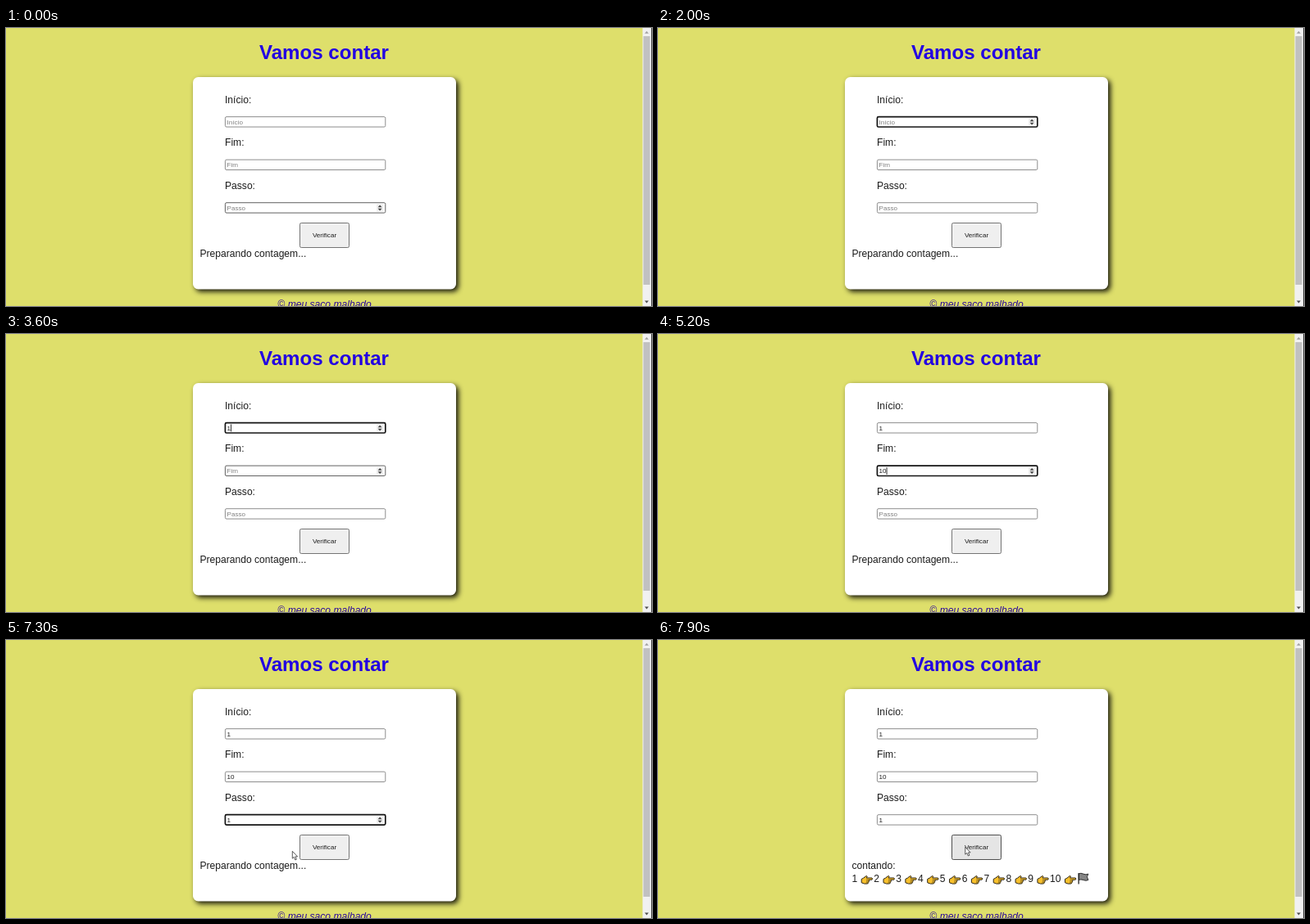
Recreate the animation shown at these times as an HTML page. Size 788 by 340 pixels, loop 8000 ms.

```html
<!DOCTYPE html>
<html lang="pt">
<head>
<meta charset="utf-8">
<title>Vamos contar</title>
<style>
  html, body { margin: 0; width: 100%; height: 100%; overflow: hidden; background: #dedf6b; }
  svg { display: block; width: 788px; height: 340px; font: 12.1px "Liberation Sans", Arial, sans-serif; fill: #1c1c1c; }
  .card { fill: #fff; filter: drop-shadow(3.8px 3.8px 3.4px rgba(0, 0, 0, .9)); }
  .title { font-size: 24.1px; font-weight: bold; fill: #2200e2; text-anchor: middle; }
  .foot { font-style: italic; fill: #2c0a9c; text-anchor: middle; }
  .small { font-size: 8.1px; }
  .box { fill: #fff; stroke: #808080; stroke-width: .9; }
  .hover .box { stroke: #505050; }
  .focus .box { stroke: #141414; stroke-width: 1.7; }
  .empty .small { fill: #808080; }
  .spin, .caret { visibility: hidden; }
  .hover .spin, .focus .spin { visibility: visible; }
  .button { fill: #efefef; stroke: #757575; }
</style>
</head>
<body>
<svg viewBox="0 0 788 340">
  <defs>
    <g id="hand" stroke="#2b2417" stroke-width="1" stroke-linejoin="round">
      <path fill="#f8c02c" d="M.6 4.6 L3 3.4 L6.2 .9 Q7.6 .5 7.6 1.8 L6.6 3.2 H13.4 Q14.6 4.3 13.4 5.4 H9.8 Q10.6 6.6 9.6 7.3 Q10 8.5 8.9 9 Q8.8 10.3 7.3 10.3 H4.2 L.6 9 Z"/>
      <path fill="none" stroke-width=".6" d="M6.6 5.4H9.8M6.4 7.3H9.6M6.2 9H8.9"/>
    </g>
    <g id="flag" stroke="#222" stroke-linejoin="round">
      <path fill="#858585" stroke-width=".9" d="M1.6 1.2 Q4 0 7 1.5 T13 1.5 L11.6 5 L13 9 Q10 10.3 7 9 T1.6 8.8 Z"/>
      <path fill="none" stroke-width="1.3" d="M1.3 .4 V14"/>
    </g>
  </defs>
  <rect width="788" height="340" fill="#dedf6b"/>
  <text class="title" x="388" y="38">Vamos contar</text>
  <rect class="card" x="228" y="60" width="321" height="259.5" rx="6.5"/>
  <g id="fields"></g>
  <rect id="button" class="button" x="358.5" y="238.5" width="60" height="30" rx="1.8"/>
  <text class="small" x="388.5" y="256.3" text-anchor="middle">Verificar</text>
  <text id="status" x="236.5" y="279.7"></text>
  <g id="result"></g>
  <text class="foot" x="388.6" y="342">© meu saco malhado</text>
  <rect x="776.5" width="11.5" height="340" fill="#f1f1f1"/>
  <rect x="777.5" y="10" width="8" height="304" fill="#c1c1c1"/>
  <path fill="#a3a3a3" d="M779 6.8 h5 l-2.5-3z"/>
  <path fill="#505050" d="M779 333.4 h5 l-2.5 3z"/>
  <rect x="787" width="1" height="340" fill="#4a4a4a"/>
  <path id="arrow" fill="#fff" stroke="#333" stroke-width=".8" stroke-linejoin="round"
    d="M.3 .3 V9.2 L2.3 7.4 L3.8 11 L5.4 10.3 L3.9 6.9 H6.6 Z"/>
</svg>
<script>
const LOOP = 8000, STEP = 100, BLINK = 530, CLICK = 7700, DONE = 7800;
const names = ['Início', 'Fim', 'Passo'];
const tops = [108.6, 161.1, 213.7];
const get = id => document.getElementById(id);

// time, focused field, its value
const entries = [
  [1450, 0, ''], [2260, 0, '1'],
  [3690, 1, ''], [4460, 1, '1'], [4690, 1, '10'],
  [5950, 2, ''], [6560, 2, '1'],
  [CLICK, -1, '']
];

// time, pointer x, pointer y
const route = [
  [0, 352, 220], [400, 352, 217], [1000, 348, 160], [1200, 348, 116],
  [2800, 348, 116], [3600, 348, 167], [5500, 348, 167], [5600, 349, 220],
  [6900, 349, 221], [7300, 349, 258], [7700, 374.5, 253], [LOOP, 374.5, 253]
];

get('fields').innerHTML = names.map((name, i) => {
  const y = tops[i];
  return `<text x="267" y="${y - 16.8}">${name}:</text>
    <g class="field">
      <rect class="box" x="267.4" y="${y}" width="195.4" height="12.4" rx="1.6"/>
      <text class="small value" x="269.6" y="${y + 9.2}"></text>
      <rect class="caret" y="${y + 1.8}" width=".9" height="9"/>
      <g class="spin" transform="translate(452 ${y + 1.8})">
        <rect width="8" height="9" fill="#efefef"/>
        <path fill="#444" d="M1.6 3.8h5L4.1 1zM1.6 5.3h5L4.1 8.1z"/>
      </g>
    </g>`;
}).join('');

const fields = [...document.querySelectorAll('.field')].map(el => ({
  el, text: el.querySelector('.value'), caret: el.querySelector('.caret')
}));

let row = '', x = 236.5;
for (let n = 1; n <= 10; n++) {
  row += `<text x="${x}" y="296">${n}</text>`;
  x += 3.36 + 6.73 * String(n).length;
  row += `<use href="#hand" x="${x + 1}" y="287.8"/>`;
  x += 16.75;
}
get('result').innerHTML = row + `<use href="#flag" x="${x + .2}" y="284.6"/>`;

function pointer(t) {
  const i = route.findIndex(p => p[0] > t);
  const [t0, x0, y0] = route[i - 1], [t1, x1, y1] = route[i];
  const k = (t - t0) / (t1 - t0);
  return [x0 + (x1 - x0) * k, y0 + (y1 - y0) * k];
}

function draw(t) {
  const [px, py] = pointer(t);
  const values = ['', '', ''];
  let focus = -1, since = 0;
  for (const [time, field, value] of entries) {
    if (time > t) break;
    focus = field;
    since = time;
    if (field >= 0) values[field] = value;
  }

  let inField = false;
  fields.forEach(({ el, text, caret }, i) => {
    const dy = py - tops[i], value = values[i];
    const blinkOn = Math.floor((t - since) / BLINK) % 2 === 0;
    if (dy >= 0 && dy <= 12.4) inField = true;
    el.classList.toggle('hover', dy >= -2 && dy <= 14);
    el.classList.toggle('focus', focus === i);
    el.classList.toggle('empty', !value);
    text.textContent = value || names[i];
    caret.setAttribute('x', 269.6 + 4.5 * value.length);
    caret.style.visibility = focus === i && blinkOn ? 'visible' : 'hidden';
  });

  const arrow = get('arrow');
  arrow.style.visibility = inField ? 'hidden' : 'visible';
  arrow.setAttribute('transform', `translate(${px} ${py})`);

  const done = t >= DONE, onButton = px > 358 && py > 238;
  get('button').style.fill = done ? '#e5e5e5' : t >= CLICK ? '#f5f5f5' : onButton ? '#e5e5e5' : '';
  get('button').style.stroke = onButton ? '#505050' : '';
  get('status').textContent = done ? 'contando:' : 'Preparando contagem...';
  get('result').style.visibility = done ? 'visible' : 'hidden';
}

const start = performance.now();
function tick() {
  const t = (performance.now() - start) % LOOP;
  draw(Math.floor(t / STEP) * STEP);
  requestAnimationFrame(tick);
}
tick();
</script>
</body>
</html>
```
